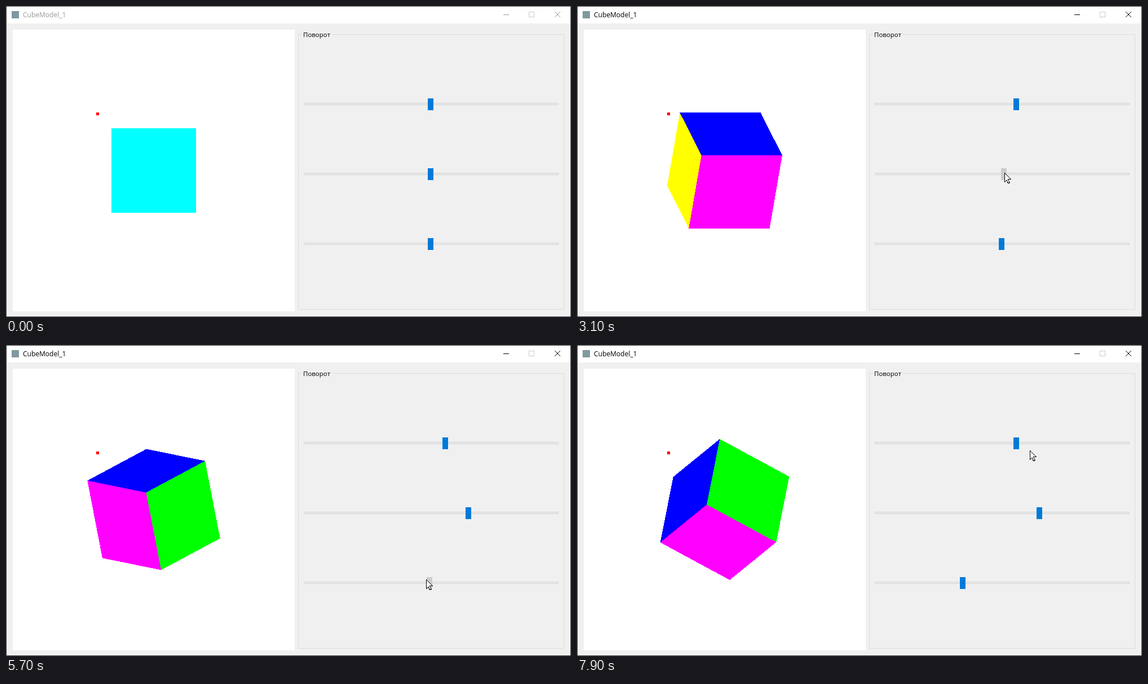
Write an HTML page that moves like this. It is 1002 px wide and 552 px high and loops after 8000 ms.

```html
<!DOCTYPE html>
<html lang="ru">
<head>
<meta charset="utf-8">
<style>
html, body { margin: 0; width: 100%; height: 100%; overflow: hidden; }
svg { display: block; width: 100vw; height: 100vh; font: 12px "Open Sans", "Noto Sans", sans-serif; }
#win { --ink: #000; --edge: #2b2b2b; }
#win.idle { --ink: #999; --edge: #444; }
.ink { stroke: var(--ink); fill: none; }
</style>
</head>
<body>
<svg id="win" viewBox="0 0 1002 552">
  <g shape-rendering="crispEdges">
    <rect width="1002" height="552" style="fill:var(--edge)"/>
    <rect x="1" y="1" width="1000" height="550" fill="#f0f0f0"/>
    <rect x="1" y="1" width="1000" height="30" fill="#fff"/>
    <rect x="10" y="9" width="13" height="13" fill="#7f999f"/>
    <path class="ink" d="M882 15.5h10"/>
    <path d="M927.5 10.5h9v9h-9z" fill="none" stroke="#ccc"/>
    <rect x="12" y="42" width="500" height="500" fill="#fff"/>
    <path d="M526 50.5h-7.5v488h471v-488H578" fill="none" stroke="#dcdcdc"/>
    <g id="cube"></g>
    <rect x="160" y="189" width="5" height="5" fill="#f00"/>
    <g id="sliders"></g>
  </g>
  <path class="ink" stroke-linecap="square" d="M973.5 10.5l9 9m0-9l-9 9"/>
  <text x="30" y="20" style="fill:var(--ink)">CubeModel_1</text>
  <text x="527" y="55" font-size="11.5">Поворот</text>
  <path id="cursor" shape-rendering="crispEdges" fill="#fff" stroke="#000"
    d="M.5.5v16l3.5-3.5 2.5 5.5h1.5l1-1-2.5-6h5z"/>
</svg>
<script>
const LOOP = 8000, STEP = 100, ACTIVE = 1300;
const PX = 1.225;                       // handle pixels per slider unit (0.1 rad)
const $ = id => document.getElementById(id);

// Key points of the pointer: time, x, y
const path = [
  [100, 74, 0], [900, 757, 173], [1300, 756, 174],
  [1700, 763, 174], [2400, 782, 175],
  [2600, 754, 296], [2800, 754, 296], [3100, 758, 296], [3700, 785, 297],
  [4200, 810, 299], [4600, 819, 300], [4800, 821, 300],
  [5200, 749, 415], [5400, 748, 416], [5600, 748, 416],
  [6300, 725, 414], [7500, 679, 414], [7900, 803, 187]
];
const drags = [[1300, 2400], [2700, 4800], [5400, 7500]];
const colours = ['#0f0', '#f0f', '#0ff', '#ff0', '#f00', '#00f'];   // +x +y +z -x -y -z

function add(parent, tag, attrs) {
  const el = document.createElementNS('http://www.w3.org/2000/svg', tag);
  for (const k in attrs) el.setAttribute(k, attrs[k]);
  return parent.appendChild(el);
}

function pointer(t) {
  const i = path.findIndex(k => k[0] > t);
  if (i < 1) return path.at(i).slice(1);
  const a = path[i - 1], b = path[i], u = (t - a[0]) / (b[0] - a[0]);
  return [1, 2].map(n => Math.round(a[n] + (b[n] - a[n]) * u));
}

const sliders = drags.map(([from, to], i) => {
  const y = 174 + 124 * i;
  add($('sliders'), 'rect', { x: 528.5, y: y - 1.5, width: 451, height: 3, fill: '#e7eaea', stroke: '#d6d6d6' });
  const handle = add($('sliders'), 'rect', { y: y - 10, width: 10, height: 21 });
  return { from, to, y, handle, grip: pointer(from)[0] };
});
const faces = colours.map((fill, i) => ({
  axis: i % 3, side: i < 3 ? 1 : -1, el: add($('cube'), 'polygon', { fill })
}));

function valueAt(s, t) {
  if (t < s.from) return 0;
  return Math.round((pointer(Math.min(t, s.to))[0] - s.grip) / PX);
}

function turn(p, i, j, angle) {
  const c = Math.cos(angle), s = Math.sin(angle), q = p.slice();
  q[i] = p[i] * c - p[j] * s;
  q[j] = p[i] * s + p[j] * c;
  return q;
}

function drawCube([a, b, c]) {
  const rotate = p => turn(turn(turn(p, 1, 2, a), 2, 0, b), 0, 1, c);
  for (const { axis, side, el } of faces) {
    const at = (u, v) => {
      const p = [];
      p[axis] = side;
      p[(axis + 1) % 3] = u;
      p[(axis + 2) % 3] = v;
      return rotate(p);
    };
    el.style.display = at(0, 0)[2] > 1e-6 ? '' : 'none';
    const corners = [at(1, 1), at(1, -1), at(-1, -1), at(-1, 1)];
    el.setAttribute('points', corners.map(([x, y]) => [262 + 75 * x, 292 - 75 * y]).join(' '));
  }
}

function render(t) {
  const [x, y] = pointer(t);
  const values = sliders.map(s => valueAt(s, t));
  $('win').setAttribute('class', t < ACTIVE ? 'idle' : '');
  $('cursor').style.display = t < path[0][0] ? 'none' : '';
  $('cursor').setAttribute('transform', `translate(${x} ${y})`);
  sliders.forEach((s, i) => {
    const left = 748 + Math.round(values[i] * PX);
    const pressed = t >= s.from && t <= s.to;
    const hover = x >= left && x < left + 10 && Math.abs(y - s.y) <= 10;
    s.handle.setAttribute('x', left);
    s.handle.setAttribute('fill', pressed ? '#ccc' : hover ? '#171717' : '#007ad9');
  });
  drawCube(values.map(v => v / 10));
}

function tick() {
  const t = performance.now() % LOOP;
  render(Math.floor(t / STEP) * STEP);
  requestAnimationFrame(tick);
}
tick();
</script>
</body>
</html>
```
